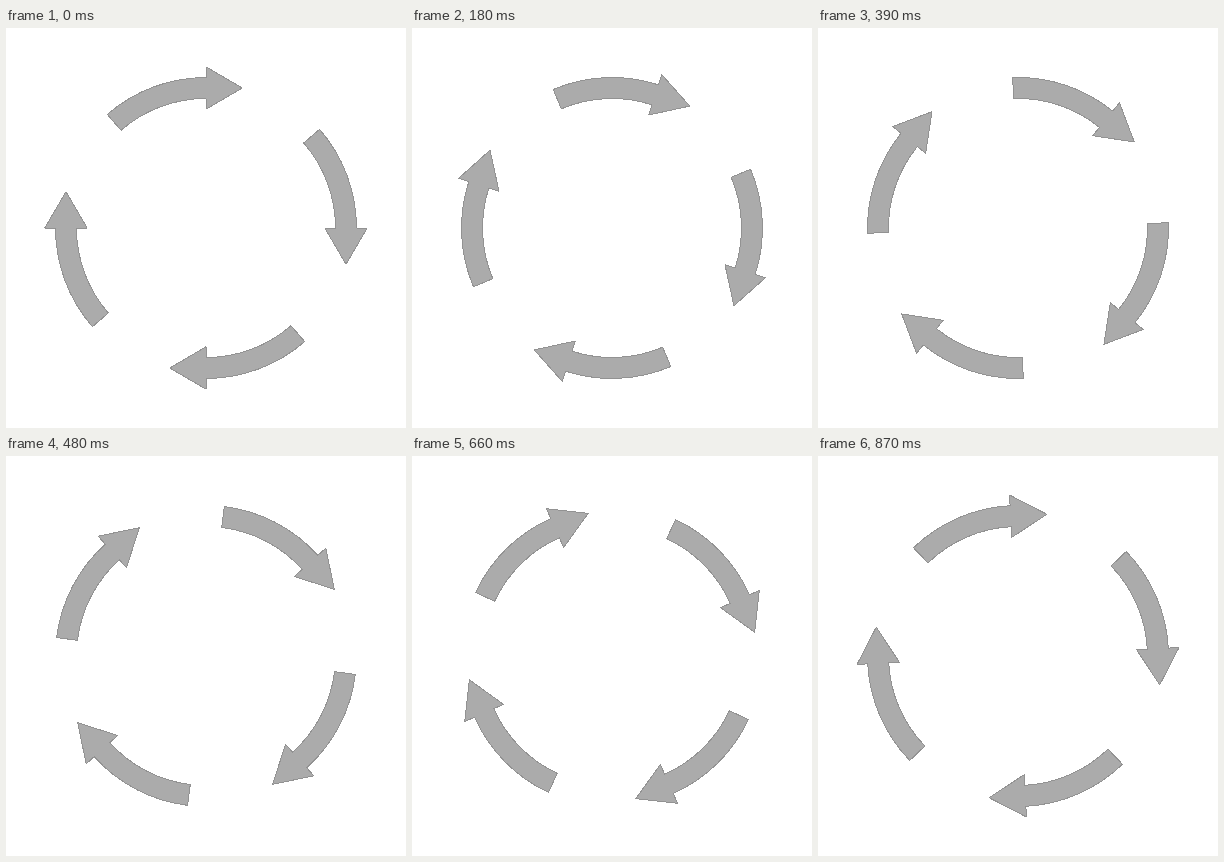
An HTML page for the animation above (0.9 s loop, 400 by 400 pixels).

```html
<!DOCTYPE html>
<html lang="en">
<head>
<meta charset="utf-8">
<title>Rotating arrows</title>
<style>
  /* Animating a registered angle repaints each step, which keeps the outline crisp. */
  @property --angle {
    syntax: "<angle>";
    inherits: false;
    initial-value: 0deg;
  }
  html, body { margin: 0; width: 100%; height: 100%; overflow: hidden; background: #fff; }
  svg { display: block; width: 100%; height: 100%; }
  #ring {
    fill: #ababab;
    stroke: #929292;
    stroke-width: 1;
    stroke-linejoin: round;
    shape-rendering: crispEdges;
    transform-origin: 0 0;
    transform: rotate(var(--angle));
    animation: turn 900ms steps(30, end) infinite;
  }
  /* A quarter turn brings each arrow onto the next one. */
  @keyframes turn {
    from { --angle: 0deg; }
    to { --angle: 90deg; }
  }
</style>
</head>
<body>
<svg viewBox="-200 -200 400 400">
  <defs>
    <path id="arrow" d="M-98.7 -113.6 A150.5 150.5 0 0 1 0 -150.5 V-161.2 L36.3 -140 L0 -118.8 V-129.5 A129.5 129.5 0 0 0 -85 -97.7 Z"/>
  </defs>
  <g id="ring">
    <use href="#arrow"/>
    <use href="#arrow" transform="rotate(90)"/>
    <use href="#arrow" transform="rotate(180)"/>
    <use href="#arrow" transform="rotate(270)"/>
  </g>
</svg>
</body>
</html>
```
